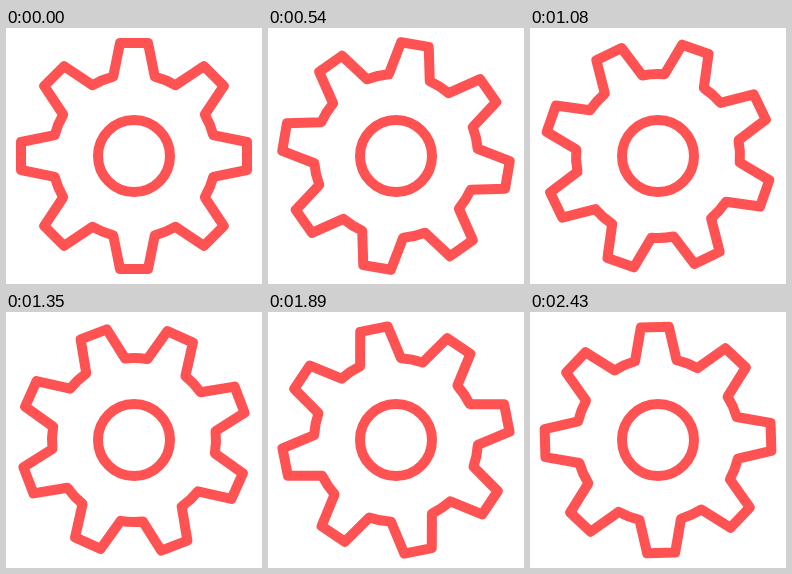
Animation of 256x256 px, one loop 2.52 s. Source, as an HTML page:

```html
<!DOCTYPE html>
<html lang="en">
<head>
<meta charset="utf-8">
<title>Turning gear</title>
<style>
  html, body { margin: 0; height: 100%; overflow: hidden; background: #fff; }
  svg { display: block; width: 100vw; height: 100vh; }
</style>
</head>
<body>
<svg viewBox="-128 -128 256 256">
  <g fill="none" stroke="#ff5252" stroke-width="10" stroke-linejoin="round">
    <circle r="36"/>
    <path id="gear"/>
  </g>
</svg>
<script>
  const LOOP = 2520, STEP = 90, TEETH = 8, PITCH = 360 / TEETH;
  const gear = document.getElementById('gear');

  // Corners of the upright tooth, left to right
  const tooth = [[-20.8, -79.3], [-14, -113], [14, -113], [20.8, -79.3]];

  function rotate([x, y], degrees) {
    const a = degrees * Math.PI / 180, c = Math.cos(a), s = Math.sin(a);
    return `${(x * c - y * s).toFixed(2)} ${(x * s + y * c).toFixed(2)}`;
  }

  // Straight-sided teeth joined by arcs along the rim
  let outline = 'M' + rotate(tooth[0], 0);
  for (let i = 0; i < TEETH; i++) {
    for (const corner of tooth.slice(1)) outline += 'L' + rotate(corner, i * PITCH);
    outline += 'A82 82 0 0 1 ' + rotate(tooth[0], (i + 1) * PITCH);
  }
  gear.setAttribute('d', outline + 'Z');

  // One loop turns the gear by one tooth, in even ticks
  function draw() {
    const tick = Math.floor(performance.now() / STEP + 0.05);
    const angle = (tick * STEP % LOOP) / LOOP * PITCH;
    gear.setAttribute('transform', `rotate(${angle})`);
    requestAnimationFrame(draw);
  }
  draw();
</script>
</body>
</html>
```
